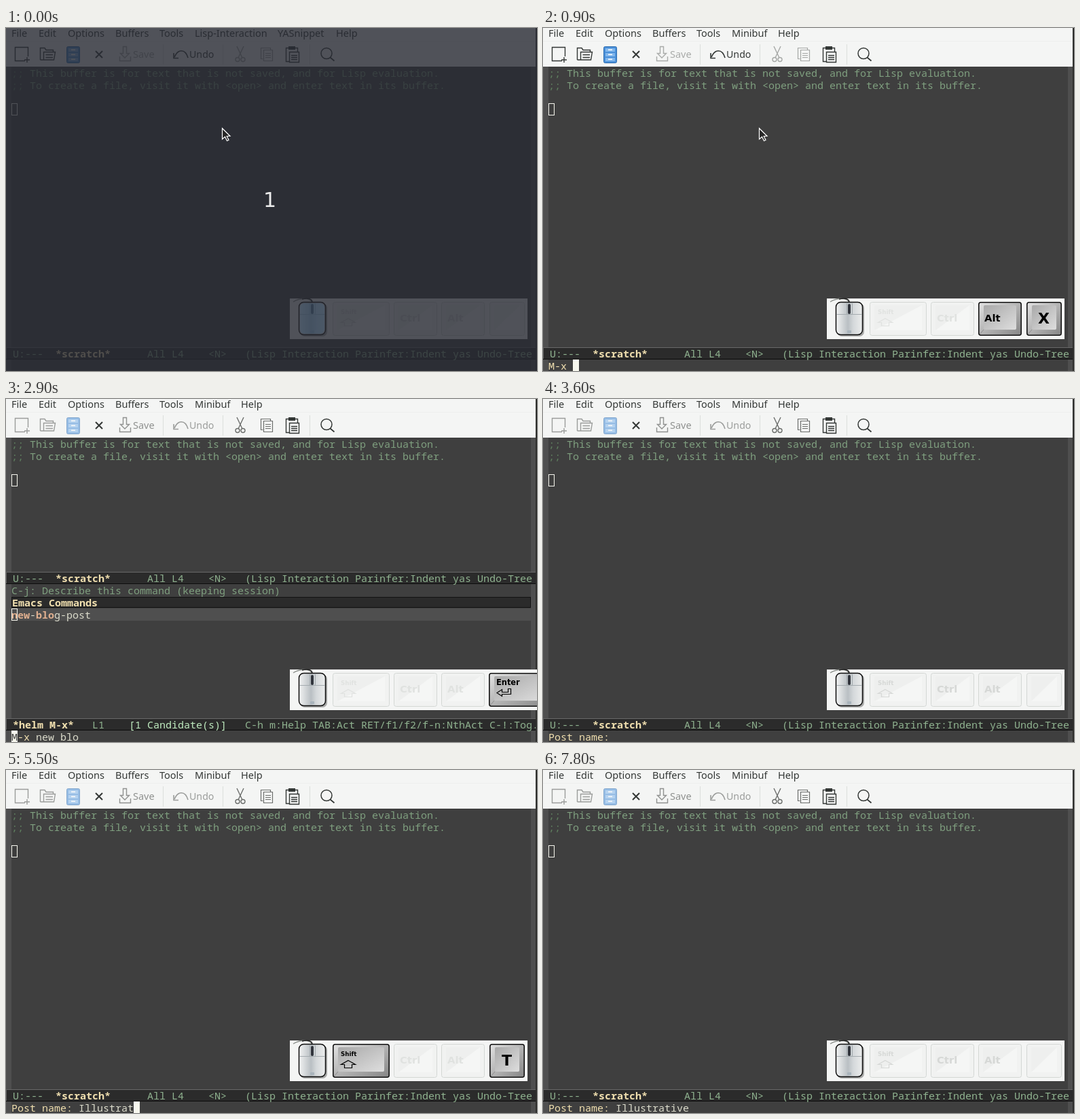
An HTML page for the animation above (8000 ms loop, 782 px wide and 506 px high).

```html
<!DOCTYPE html>
<html lang="en">
<head>
<meta charset="utf-8">
<title>Editor session</title>
<style>
  html, body { margin: 0; width: 100%; height: 100%; overflow: hidden; background: #3f3f3f; }
  svg { display: block; }
  text { white-space: pre; }
  .mono { font: 15px "Noto Sans Mono", monospace; }
  .ui { font: 14.5px "Noto Sans", sans-serif; }
  .key { font-family: "DejaVu Sans", sans-serif; font-weight: bold; }
  .b { font-weight: bold; }
</style>
</head>
<body>
<svg id="stage" width="782" height="506" viewBox="0 0 782 506">
  <defs>
    <linearGradient id="rim" x2="1" y2="1"><stop stop-color="#e2e2e2"/><stop offset=".5" stop-color="#b4b4b4"/><stop offset="1" stop-color="#858585"/></linearGradient>
    <linearGradient id="face" x2="1" y2="1"><stop stop-color="#a9a9a9"/><stop offset="1" stop-color="#dedede"/></linearGradient>
    <linearGradient id="body"><stop stop-color="#f2f3f3"/><stop offset=".45" stop-color="#b9bfc3"/><stop offset=".65" stop-color="#d4d8da"/><stop offset="1" stop-color="#eceeee"/></linearGradient>
  </defs>
  <g id="view"></g>
</svg>
<script>
const LOOP = 8000, CH = 9;
const C = {
  bg: '#3f3f3f', dark: '#2b2b2b', fringe: '#4f4f4f', fg: '#dcdccc', green: '#7f9f7f',
  deep: '#5f7f5f', mode: '#8fb28f', pale: '#bfebbf', gold: '#f0dfaf', match: '#dfaf8f', cursor: '#f8f8ee'
};

const COMMANDS = ['new-blog-post', 'package-list-packages', 'eval-buffer', 'describe-mode', 'magit-status',
  'org-agenda', 'align-regexp', 'sort-lines', 'toggle-truncate-lines'];
const NEW = ['newline', 'new-frame', 'new-blog-post', 'newsticker-start', 'newline-and-indent',
  'newsticker-treeview', 'newsticker-plainview', 'newsticker-show-news', 'newsticker-start-ticker'];

// Each step changes only the fields it names.
const steps = [
  [0, { dim: 1, hollow: 1, pointer: 1, menu: 'Lisp-Interaction,YASnippet', tools: 1,
        prompt: '', typed: '', caret: 0, key: '', list: null, count: 44 }],
  [400, { dim: 0, hollow: 0, press: 1 }],
  [600, { alt: 1 }],
  [700, { key: 'X' }],
  [800, { prompt: 'M-x ', caret: 1, hollow: 1, menu: 'Minibuf' }],
  [900, { press: 0 }],
  [1200, { alt: 0, key: '', tools: 0, list: COMMANDS }],
  [1400, { typed: 'ne', key: 'E', pointer: 0 }],
  [1500, { typed: 'new', key: 'W', list: NEW }],
  [1600, { typed: 'new ', key: 'Space' }],
  [1800, { count: 9 }],
  [2100, { typed: 'new b', key: 'B', list: ['new-blog-post'] }],
  [2300, { typed: 'new bl', key: 'L' }],
  [2400, { typed: 'new blo', key: 'O' }],
  [2500, { count: 1 }],
  [2900, { key: 'Enter', home: 1 }],
  [3000, { list: null, home: 0, prompt: 'Post name: ', typed: '' }],
  [3400, { caret: 0 }],
  [3600, { key: '' }],
  [4000, { typed: 'I', key: 'I', shift: 1, caret: 1 }],
  [4200, { typed: 'Il', key: 'L' }],
  [4300, { typed: 'Ill' }],
  [4400, { typed: 'Illu', key: 'U' }],
  [4500, { typed: 'Illus', key: 'S' }],
  [4700, { typed: 'Illustr', key: 'R' }],
  [5000, { typed: 'Illustrt', key: 'T' }],
  [5300, { typed: 'Illustr', key: 'Back' }],
  [5400, { typed: 'Illustra', key: 'A' }],
  [5500, { typed: 'Illustrat', key: 'T' }],
  [5600, { typed: 'Illustrati', key: 'I' }],
  [5700, { typed: 'Illustrativ', key: 'V' }],
  [5800, { typed: 'Illustrative', key: 'E' }],
  [6100, { typed: 'Illustrative ', key: 'Space' }],
  [6300, { typed: 'Illustrative E', key: 'E' }],
  [6500, { typed: 'Illustrative Ex', key: 'X' }],
  [6800, { typed: 'Illustrative E', key: 'Back' }],
  [7100, { typed: 'Illustrative ' }],
  [7200, { typed: 'Illustrative' }],
  [7700, { caret: 0 }],
  [7800, { key: '', shift: 0 }]
];

const esc = s => s.replace(/&/g, '&amp;').replace(/</g, '&lt;');
const rect = (x, y, w, h, fill, more = '') => `<rect x="${x}" y="${y}" width="${w}" height="${h}" fill="${fill}" ${more}/>`;
const text = (x, y, s, fill, cls = 'mono', more = '') => `<text x="${x}" y="${y}" fill="${fill}" class="${cls}" ${more}>${esc(s)}</text>`;
const line = (d, color, w = 1.4, fill = 'none') => `<path d="${d}" stroke="${color}" stroke-width="${w}" fill="${fill}"/>`;
const box = (x, y) => rect(x + .5, y + .5, 8, 17, 'none', `stroke="${C.cursor}"`);

function menuBar(s) {
  const names = ('File,Edit,Options,Buffers,Tools,' + s.menu + ',Help').split(',');
  const xs = [8, 48, 91, 161, 226, 278].concat(names.length > 7 ? [400, 486] : [346]);
  return rect(0, 0, 780, 57, '#f4f5f4') + rect(0, 19, 780, 1, '#eeefed') +
    names.map((n, i) => text(xs[i], 13, n, '#333735', 'ui')).join('');
}

function toolBar(on) {
  const ink = '#333735', grey = '#9b9d9b';
  const a = on ? ink : grey, b = on ? '#a6a8a6' : '#6c6e6c', save = on ? '#a9aba9' : '#8f918f';
  let out = [231, 319, 447].map(x => rect(x, 24, 1, 30, '#dcdfdc')).join('');
  out += line('M28 48.5H13.5V28.5H32.5V42M31 43V51M27 47H35', a);
  out += line('M50.500 47V29.500H57L59 32.500H69.500V35M50.500 47H70.500L72.500 35.500H55.500V47M58.500 39.500H69M58.500 43.500H69', a);
  out += `<g opacity="${on ? 1 : .55}">` + rect(89.5, 27.5, 19, 24, '#4a90d9', 'rx="2" stroke="#2e6cb0"') +
    [30, 37, 44].map(y => rect(92, y, 14, 5, '#82b7ec') + rect(96, y + 1.500, 6, 1.500, '#fff')).join('') + '</g>';
  out += line('M132 34L142 44M142 34L132 44', ink, 2);
  out += line('M172.500 27.500H177.500V37.500H181.500L175 44L168.500 37.500H172.500ZM167.500 42V48.500H183.500V42', save);
  out += text(187, 44, 'Save', save, 'ui');
  out += line('M248 43C253 31 264 30 268 44', a, 1.600) + line('M247 37V44.500H254', a, 1.600);
  out += text(270, 44, 'Undo', a, 'ui', 'style="font-size:14.2px"');
  out += line('M340 27L348 44M350 27L342 44', b) +
    [341, 349].map(x => `<circle cx="${x}" cy="46.500" r="3" fill="none" stroke="${b}" stroke-width="1.400"/>`).join('');
  out += line('M378.500 45.500H375.500V29.500H389.500V32M379.500 32.500H392.500V48.500H379.500ZM382 37.500H390M382 40.500H390M382 43.500H390', b, 1.200);
  out += line('M417 49.500H412.500V29.500H429.500V35M417.500 35.500H431.500V50.500H417.500ZM420 40.500H429M420 43.500H429M420 46.500H429', ink) +
    rect(416, 27, 10, 5, ink);
  return out + `<circle cx="472" cy="37.500" r="8" fill="none" stroke="${ink}" stroke-width="1.500"/>` + line('M477.500 43.500L483.500 48.500', ink, 1.700);
}

function modeLine(y, parts) {
  return rect(0, y, 780, 18, C.dark) + rect(0, y, 780, 1, '#686868') + rect(0, y, 1, 18, '#606060') + rect(0, y + 17, 780, 1, '#0c0c0c') +
    parts.map(([col, s, color = C.mode, cls = '']) => text(10 + col * CH, y + 15, s, color, 'mono ' + cls)).join('');
}

const scratchLine = y => modeLine(y, [[0, 'U:---'], [7, '*scratch*', C.gold, 'b'], [22, 'All L4'], [32, '<N>'],
  [38, '(Lisp Interaction Parinfer:Indent yas Undo-Tree']]);

function candidate(name, i, terms) {
  const y = 309 + 18 * i;
  let x = 8, out = i ? '' : rect(8, y, 765, 18, C.fringe);
  const runs = terms.length ? name.split(new RegExp('(' + terms.join('|') + ')')) : [name];
  runs.forEach((run, k) => {
    const hit = k % 2;
    if (hit && i) out += rect(x, y, run.length * CH, 18, C.dark);
    out += text(x, y + 15, run, hit ? C.match : C.fg, hit ? 'mono b' : 'mono');
    x += run.length * CH;
  });
  return out + (i ? '' : box(8, y));
}

function helm(s) {
  const terms = s.list === COMMANDS ? [] : s.typed.trim().split(' ');
  return scratchLine(255) + text(8, 288, 'C-j: Describe this command (keeping session)', C.green) +
    rect(8.5, 292.5, 764, 15, C.dark, 'stroke="#121212"') + text(9, 306, 'Emacs Commands', C.gold, 'mono b') +
    s.list.map((n, i) => candidate(n, i, terms)).join('') +
    modeLine(471, [[0, '*helm M-x*', C.gold, 'b'], [13, 'L1'], [19, `[${s.count} Candidate(s)]`, C.pale],
      [38, 'C-h m:Help TAB:Act RET/f1/f2/f-n:NthAct C-!:Tog.']]);
}

function miniBuffer(s) {
  const at = 8 + s.prompt.length * CH;
  let out = text(8, 504, s.prompt, C.gold) + text(at, 504, s.typed, C.fg);
  if (s.home) out += rect(8, 489, CH, 17, C.cursor) + text(8, 504, s.prompt[0], C.bg);
  else if (s.caret) out += rect(at + s.typed.length * CH, 489, CH, 17, C.cursor);
  return out;
}

function cap(x, w, lit) {
  if (lit) return rect(x + .8, 404.8, w - 1.6, 48.4, 'url(#rim)', 'rx="3" stroke="#111" stroke-width="1.600"') +
    rect(x + 8, 409, w - 16, 36, 'url(#face)', 'rx="2"') + line(`M${x + 2} 452L${x + 8} 445M${x + w - 2} 452L${x + w - 8} 445`, '#8d8d8d', 1);
  return rect(x + .5, 404.5, w - 1, 49, '#f1f2f1', 'rx="3" stroke="#d3d7d4"') + rect(x + 7, 409, w - 14, 37, '#eeefee', 'rx="2"') +
    `<path d="M${x + 7} 446L${x + w - 7} 409V446Z" fill="#f5f6f5"/>`;
}

function mouse(press) {
  return line('M423 404C432 398 448 397 451 405', '#8b8f8b', 1.3) + line('M436 400C444 398 451 399 451 405', '#222', 1.500) +
    rect(433, 406, 40, 49, '#777', 'rx="7" opacity=".6"') +
    rect(431.5, 404.5, 39, 48, 'url(#body)', 'rx="7" stroke="#0c0c0c" stroke-width="1.500"') +
    (press ? `<path d="M432.500 422V411Q433 405.500 439 405.500H447V422Z" fill="#7c4225"/>` : '') +
    line('M432 422.500H470M447.500 405V422M455.500 405V422', '#a4abaf', 1) +
    rect(449, 407, 4, 15, '#30343c', 'rx="2"') + rect(448, 446, 6, 4, '#a9b4bc', 'rx="1"');
}

function keys(s) {
  const wide = s.key.length > 1, quiet = !s.key && !s.shift && !s.alt;
  const faint = quiet ? '#d6d8d6' : '#e0e2e0';
  const ink = lit => lit ? '#000' : faint;
  const label = (x, y, t, size, color, more = '') => text(x, y, t, color, 'key', `font-size="${size}" ${more}`);
  let out = rect(418, 399, wide ? 364 : 350, 60, '#f4f5f4') + mouse(s.press);
  out += cap(481, 84, s.shift) + label(493, 422, 'Shift', 8.7, ink(s.shift)) +
    line('M504 428.500L514.500 434.500H509.500V439.500H498.500V434.500H493.500Z', ink(s.shift), 1.2);
  out += cap(571, 64, 0) + label(580, 433, 'Ctrl', 14.8, faint);
  out += cap(641, 64, s.alt) + label(650, 433, 'Alt', 14.8, ink(s.alt));
  if (!wide) return out + cap(712, 52, s.key) + (s.key ? label(737.5, 436, s.key, 22, '#000', 'text-anchor="middle"') : '');
  out += cap(711, 90, 1) + label(722, 422, s.key, 11.4, '#000');
  if (s.key === 'Enter') out += line('M743.500 427.500V435.500H730.500V438.500L723 433.500L730.500 428.500V432.500H739.500V427.500Z', '#000', 1.2);
  if (s.key === 'Back') out += line('M743.500 431.500H730.500V428.500L723 433.500L730.500 438.500V435.500H743.500Z', '#000', 1.2);
  return out;
}

function veil() {
  return rect(0, 0, 782, 506, 'rgb(39,42,51)', 'opacity=".8"') + rect(433, 406, 36, 45, '#466a8a', 'rx="6" opacity=".3"') +
    text(388.5, 264, '1', '#ececec', '', 'text-anchor="middle" font-size="30" font-family="DejaVu Sans, sans-serif"');
}

function scene(s) {
  let out = rect(0, 0, 782, 506, C.bg) + rect(0, 57, 8, 449, C.fringe) + rect(773, 57, 7, 449, C.fringe) + rect(780, 0, 2, 506, '#2d2d2b');
  out += menuBar(s) + toolBar(s.tools);
  out += ['This buffer is for text that is not saved, and for Lisp evaluation.',
    'To create a file, visit it with <open> and enter text in its buffer.']
    .map((t, i) => text(8, 72 + 18 * i, ';;', C.deep) + text(35, 72 + 18 * i, t, C.green)).join('');
  out += s.hollow ? box(8, 111) : rect(8, 111, CH, 18, C.cursor);
  out += s.list ? helm(s) : scratchLine(471);
  out += rect(780, 57, 2, 449, '#2d2d2b') + miniBuffer(s) + keys(s);
  if (s.dim) out += veil();
  if (s.pointer) out += line('M318.500 148V164L322.500 160.500L325.500 166.500L328 165.300L325.200 159.500H330Z', '#fff', 1.2, '#262626');
  return out;
}

const view = document.getElementById('view');
let shown = -1;

function draw(ms) {
  const t = ms % LOOP;
  const n = steps.filter(([at]) => at <= t).length;
  if (n === shown) return;
  shown = n;
  view.innerHTML = scene(Object.assign({}, ...steps.slice(0, n).map(step => step[1])));
}

const start = performance.now();
function tick() {
  draw(performance.now() - start);
  requestAnimationFrame(tick);
}
tick();
</script>
</body>
</html>
```
